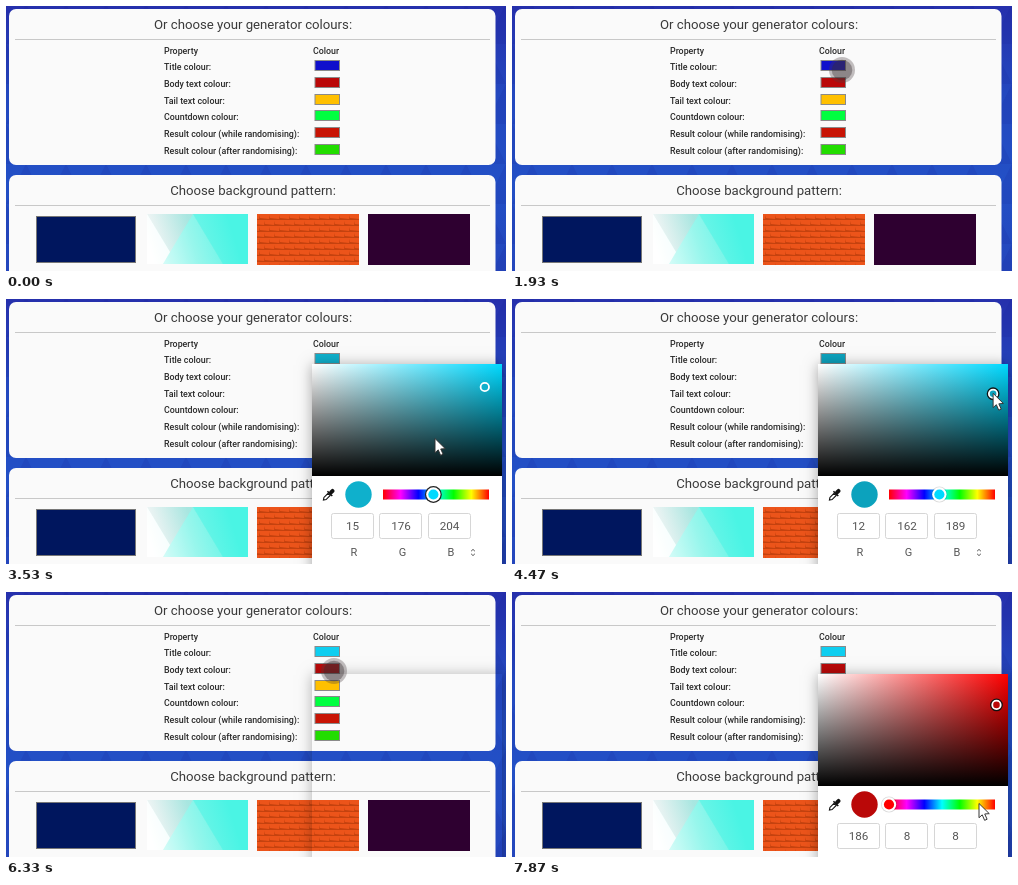
Write an HTML page with a canvas that moves like this. It is 500x265 px and loops after 8 s.

```html
<!DOCTYPE html>
<html lang="en">
<head>
<meta charset="utf-8">
<title>Choosing generator colours</title>
<style>
html, body { margin: 0; width: 100%; height: 100%; overflow: hidden; background: #2340b8; }
canvas { display: block; }
</style>
</head>
<body>
<canvas id="stage" width="500" height="265"></canvas>
<script>
const c = document.getElementById('stage').getContext('2d');
const LOOP = 8000, STEP = 200 / 3;
const FACE = 'Roboto, "Open Sans", sans-serif';

// Pointer path: time, x, y
const PATH = [
  [1200, 400, 262], [1800, 328, 68], [1930, 330, 64], [2130, 330, 64],
  [2730, 436, 193], [2930, 428, 192], [3200, 428, 192], [3400, 415, 166],
  [3530, 429, 139.5], [4070, 482, 112], [4930, 480, 72], [5270, 270, 95],
  [5400, 270, 95], [5800, 326, 97], [5930, 328, 79], [6730, 328, 79],
  [6930, 330, 85], [7600, 471, 197], [7870, 467, 211.5]
];
const PRESSES = [[1860, 2330], [5260, 5420], [5920, 6990]];

const ROWS = [
  ['Title colour:', null],
  ['Body text colour:', '#ba0808'],
  ['Tail text colour:', '#ffc000'],
  ['Countdown colour:', '#00ff40'],
  ['Result colour (while randomising):', '#c81404'],
  ['Result colour (after randomising):', '#22dd00']
];

const clamp = v => Math.max(0, Math.min(1, v));
const smooth = v => v * v * (3 - 2 * v);
const css = rgb => `rgb(${rgb.join()})`;

function hsv(h, s, v) {
  return [5, 3, 1].map(n => {
    const k = (n + h / 60) % 6;
    return Math.round(255 * (v - v * s * Math.max(0, Math.min(k, 4 - k, 1))));
  });
}

function pointerAt(t) {
  let i = 0;
  while (i < PATH.length - 2 && t >= PATH[i + 1][0]) i++;
  const [t0, x0, y0] = PATH[i], [t1, x1, y1] = PATH[i + 1];
  const p = smooth(clamp((t - t0) / (t1 - t0)));
  return { x: x0 + (x1 - x0) * p, y: y0 + (y1 - y0) * p };
}

function titleColour(t) {
  if (t < 3060) return { h: 240, s: .9265, v: .8 };
  if (t < 4130) return { h: 188.95, s: .9265, v: .8 };
  const p = t >= 4930 ? 1 : (112 - pointerAt(t).y) / 40;
  return { h: 188.95, s: .94 - .0025 * p, v: .58 + .3612 * p };
}

function rect(x, y, w, h, fill) {
  c.fillStyle = fill;
  c.fillRect(x, y, w, h);
}

function poly(points, fill) {
  c.beginPath();
  points.forEach(([x, y]) => c.lineTo(x, y));
  c.closePath();
  if (fill) { c.fillStyle = fill; c.fill(); }
}

function disc(x, y, r, fill) {
  c.beginPath();
  c.arc(x, y, r, 0, Math.PI * 2);
  c.fillStyle = fill;
  c.fill();
}

function ring(x, y, r, width, stroke) {
  c.beginPath();
  c.arc(x, y, r, 0, Math.PI * 2);
  c.lineWidth = width;
  c.strokeStyle = stroke;
  c.stroke();
}

function text(str, x, y, size, { weight = 400, align = 'left', fill = '#2a2a2a' } = {}) {
  c.font = `${weight} ${size}px ${FACE}`;
  c.textAlign = align;
  c.textBaseline = 'alphabetic';
  c.fillStyle = fill;
  c.fillText(str, x, y);
}

function ramp(x0, y0, x1, y1, stops) {
  const g = c.createLinearGradient(x0, y0, x1, y1);
  stops.forEach((s, i) => g.addColorStop(i / (stops.length - 1), s));
  return g;
}

function inBox(x, y, w, h, draw) {
  c.save();
  c.beginPath();
  c.rect(x, y, w, h);
  c.clip();
  draw();
  c.restore();
}

function backdrop() {
  rect(0, 0, 500, 265, ramp(0, 0, 0, 265, ['#2630ac', '#2348bf', '#2350c6', '#2446bc']));
  for (let row = 0; row < 7; row++) {
    for (let x = -40 + row % 2 * 20; x < 520; x += 40) {
      const y = row * 40 - 2;
      poly([[x, y + 40], [x + 20, y], [x + 40, y + 40]], 'rgba(20,24,140,.12)');
    }
  }
}

function card(y, h, title) {
  c.beginPath();
  c.roundRect(3, y, 486.5, h, 7);
  c.fillStyle = '#fafafa';
  c.fill();
  text(title, 247, y + 20, 13.2, { align: 'center', fill: '#3a3a3a' });
  rect(9, y + 30, 475, 1, '#c8c8c8');
}

function facets() {
  inBox(141, 208, 101, 50, () => {
    rect(141, 208, 101, 50, ramp(146, 250, 226, 225, ['#ffffff', '#9cf5ec', '#4df4e4']));
    poly([[141, 208], [187, 208], [164, 246]],
      ramp(145, 225, 182, 212, ['rgba(240,244,244,.9)', 'rgba(176,224,220,.7)']));
    poly([[141, 208], [164, 246], [157, 258], [141, 258]], 'rgba(255,255,255,.8)');
    poly([[187, 208], [217, 258], [157, 258]], 'rgba(140,245,236,.25)');
    poly([[187, 208], [242, 208], [242, 258], [217, 258]], 'rgba(72,246,230,.5)');
  });
}

function bricks() {
  inBox(251, 208, 102, 51, () => {
    rect(251, 208, 102, 51, '#ec541a');
    for (let row = 0; row < 9; row++) {
      const y = 208 + row * 6;
      for (let x = 244 + row % 2 * 5; x < 355; x += 10) {
        poly([[x, y + 6], [x, y + 4], [x + 9, y + 5], [x + 10, y + 1], [x + 10, y + 6]], '#c4420f');
      }
    }
  });
}

function page(title) {
  backdrop();
  card(3, 156, 'Or choose your generator colours:');
  card(169, 110, 'Choose background pattern:');
  const bold = { weight: 500 };
  text('Property', 158, 48, 8.85, bold);
  text('Colour', 320, 48, 8.85, { weight: 500, align: 'center' });
  ROWS.forEach(([label, fill], i) => {
    const y = 55 + Math.round(i * 16.8);
    text(label, 158, y + 9, 8.85, bold);
    rect(308.5, y - 1, 25.5, 11, '#8a8a8a');
    rect(309.5, y, 23.5, 9, fill || title);
  });
  rect(30, 210, 100, 47, '#777');
  rect(31, 211, 98, 45, '#00165e');
  facets();
  bricks();
  rect(362, 208, 102, 51, '#2e0030');
}

function shadow(top, alpha) {
  c.save();
  c.beginPath();
  c.rect(0, 0, 500, 265);
  c.rect(306, top, 190, 240);
  c.clip('evenodd');
  c.shadowColor = `rgba(0,0,0,${alpha})`;
  c.shadowBlur = 13;
  c.shadowOffsetY = 1;
  rect(306, top, 190, 240, '#fff');
  c.restore();
}

function dropper(x, y) {
  c.save();
  c.translate(x, y);
  c.rotate(Math.PI / 4);
  c.scale(.9, .9);
  c.fillStyle = '#111';
  c.beginPath();
  c.roundRect(-2.2, -8.5, 4.4, 6.5, 2);
  c.fill();
  c.fillRect(-3.8, -3, 7.6, 1.7);
  c.lineWidth = 1.2;
  c.strokeStyle = '#111';
  poly([[-1.7, -1], [1.7, -1], [1.7, 5.5], [0, 8], [-1.7, 5.5]]);
  c.stroke();
  c.restore();
}

function chevrons(x, y) {
  c.strokeStyle = '#555';
  c.lineWidth = 1;
  for (const d of [-1, 1]) {
    c.beginPath();
    c.moveTo(x - 1.9, y + d * 1.3);
    c.lineTo(x, y + d * 3.1);
    c.lineTo(x + 1.9, y + d * 1.3);
    c.stroke();
  }
}

function picker(top, { h, s, v }, hueFocus) {
  const rgb = hsv(h, s, v), fill = css(rgb), pure = css(hsv(h, 1, 1));
  shadow(top, .35);
  rect(306, top, 190, 240, '#fff');
  rect(306, top, 190, 112, ramp(306, 0, 496, 0, ['#fff', pure]));
  rect(306, top, 190, 112, ramp(0, top, 0, top + 112, ['rgba(0,0,0,0)', '#000']));

  const hx = 306 + 186.5 * s, hy = top + .6 + 112 * (1 - v);
  disc(hx, hy, 5, fill);
  if (!hueFocus) ring(hx, hy, 5.6, 1.6, '#111');
  ring(hx, hy, 4.2, 1.8, '#fff');

  const mid = top + 130.5;
  dropper(322.5, mid + .5);
  disc(352.5, mid, 13.2, fill);
  const wheel = [360, 300, 240, 180, 120, 60, 0].map(a => css(hsv(a, 1, 1)));
  rect(377, mid - 5, 106, 10, ramp(377, 0, 483, 0, wheel));
  const kx = 377 + 106 * ((360 - h) % 360) / 360;
  if (hueFocus) disc(kx, mid, 8.4, '#222');
  else disc(kx, mid, 8, 'rgba(0,0,0,.14)');
  disc(kx, mid, 7.2, '#fff');
  disc(kx, mid, 5.1, pure);

  rgb.forEach((n, i) => {
    const x = 325 + i * 48.5;
    c.beginPath();
    c.roundRect(Math.floor(x) + .5, top + 149.5, 42, 25, 2);
    c.lineWidth = 1;
    c.strokeStyle = '#d6d6d6';
    c.stroke();
    text(n, x + 21.5, top + 166, 11.7, { align: 'center', fill: '#555' });
    text('RGB'[i], x + 23, top + 192, 11, { align: 'center', fill: '#555' });
  });
  chevrons(467, top + 188.5);
}

function arrow(x, y) {
  c.save();
  c.translate(x, y);
  c.scale(1.08, 1.08);
  poly([[0, 0], [0, 13.2], [3, 10.5], [5.2, 15.6], [7.5, 14.6], [5.3, 9.7], [9.5, 9.4]], '#fff');
  c.lineWidth = .9;
  c.lineJoin = 'round';
  c.strokeStyle = '#333';
  c.stroke();
  c.restore();
}

function press(x, y) {
  disc(x, y, 13, 'rgba(74,62,66,.32)');
  disc(x, y, 10.3, 'rgba(54,44,48,.38)');
}

function draw(t) {
  const title = titleColour(t);
  page(css(hsv(title.h, title.s, title.v)));
  if (t >= 1990 && t < 5390) picker(65, title, t >= 3060 && t < 4130);
  else if (t >= 6390) picker(82, { h: 0, s: .957, v: .7294 }, false);
  else if (t >= 6320) shadow(82, .3);
  if (t < 1195) return;
  const { x, y } = pointerAt(t);
  if (PRESSES.some(([from, to]) => t >= from && t < to)) press(x, y);
  else arrow(x, y);
}

const start = performance.now();
function tick() {
  const t = (performance.now() - start) % LOOP;
  draw(Math.floor((t + 5) / STEP) % (LOOP / STEP) * STEP);
  requestAnimationFrame(tick);
}
tick();
</script>
</body>
</html>
```
